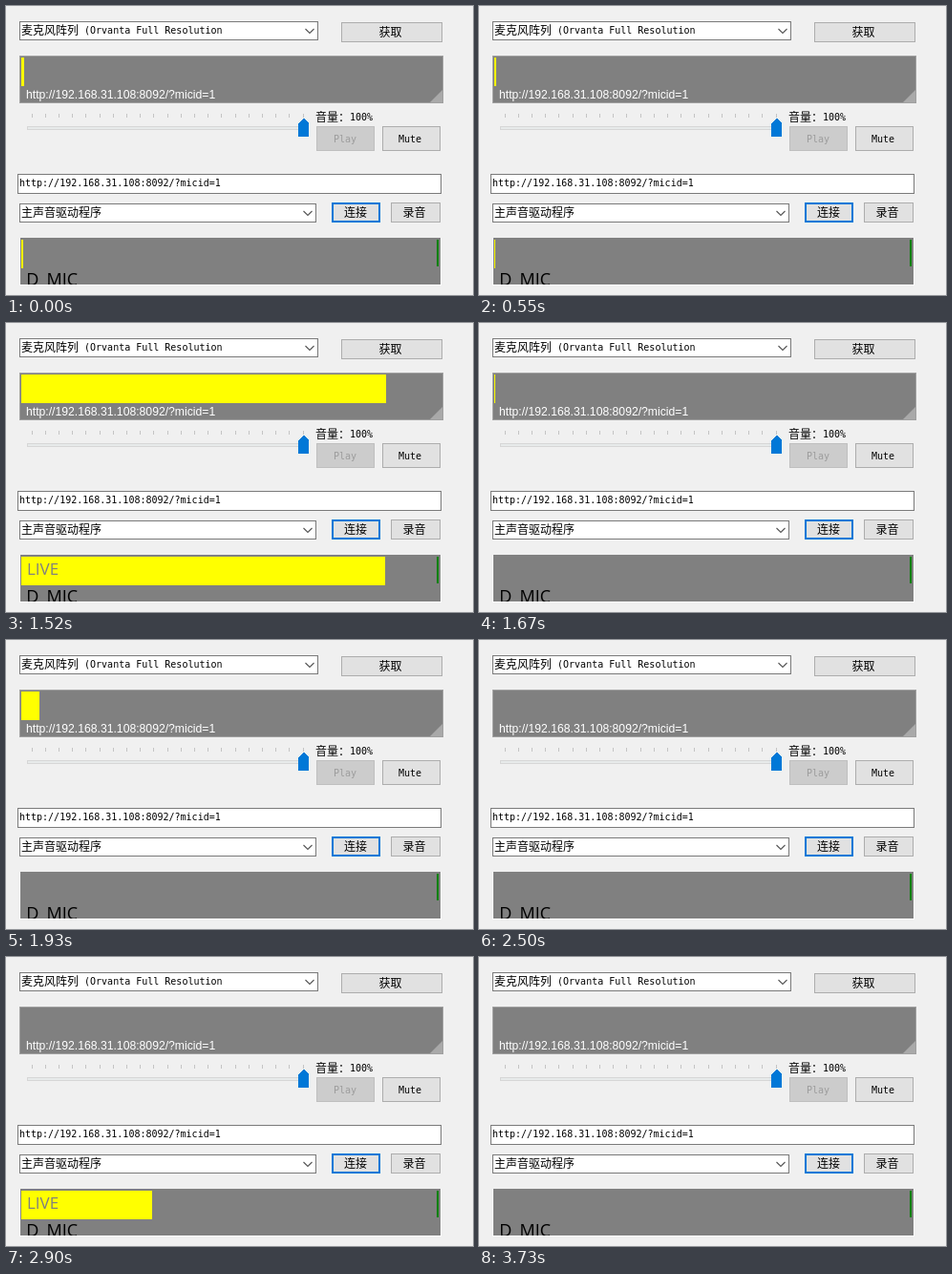
These frames come from a looping animation (489x303 px, 3.9 s). An HTML page:

```html
<!DOCTYPE html>
<html lang="zh">
<head>
<meta charset="utf-8">
<title>Audio level meters</title>
<style>
  html, body { margin: 0; width: 100%; height: 100%; overflow: hidden; background: #f0f0f0; }
  svg { display: block; }
  rect, .crisp { shape-rendering: crispEdges; }
  text { font: 10px "DejaVu Sans Mono", "Liberation Mono", monospace; white-space: pre; }
  .cjk { font: 12px "Noto Sans CJK SC", "Noto Sans CJK", sans-serif; }
  .mid { text-anchor: middle; }
  .field { fill: #fff; stroke: #7a7a7a; }
  .button { fill: #e1e1e1; stroke: #adadad; }
  .chevron { fill: none; stroke: #555; stroke-width: 1.1; }
  .panel { fill: #808080; }
  .level { fill: #ff0; }
  .url { font: 12.2px "Liberation Sans", Arial, sans-serif; fill: #fff; }
  .live { font: 17px "Open Sans", sans-serif; fill: #808080; }
  .name { font: 18px "Open Sans", sans-serif; fill: #000; }
</style>
</head>
<body>
<svg width="489" height="303" viewBox="0 0 489 303">
  <clipPath id="inside"><rect x="15" y="243" width="440" height="49"/></clipPath>

  <!-- Input device -->
  <rect class="field" x="14.5" y="16.5" width="312" height="19"/>
  <text x="16" y="29"><tspan class="cjk" dy="1">麦克风阵列</tspan><tspan dy="-1"> (Orvanta Full Resolution</tspan></text>
  <path class="chevron" d="M313.5 24l4.5 4.5 4.5-4.5"/>
  <rect class="button" x="351.5" y="17.5" width="105" height="20"/>
  <text class="cjk mid" x="402.5" y="32">获取</text>

  <!-- Upper meter -->
  <rect class="panel" x="14.5" y="52.5" width="443" height="49" stroke="#a0a0a0"/>
  <rect class="level" id="upper" x="16" y="54" height="30"/>
  <path d="M457 88v13h-13z" fill="#a9a9a9"/>
  <text class="url" x="21" y="97">http://192.168.31.108:8092/?micid=1</text>

  <!-- Volume -->
  <path class="crisp" id="ticks" stroke="#c4c4c4"/>
  <rect x="22.5" y="126.5" width="294" height="3" fill="#e7eaea" stroke="#d6d6d6"/>
  <path class="crisp" d="M311.5 117.5l5.5 5.5v14h-11v-14z" fill="#0078d7"/>
  <text x="324" y="120"><tspan class="cjk" dy="1">音量：</tspan><tspan dy="-1">100%</tspan></text>
  <rect x="325.5" y="126.5" width="60" height="25" fill="#ccc" stroke="#bfbfbf"/>
  <text class="mid" x="355" y="143" fill="#9c9c9c">Play</text>
  <rect class="button" x="394.5" y="126.5" width="60" height="25"/>
  <text class="mid" x="423" y="143">Mute</text>

  <!-- Output device -->
  <rect class="field" x="12.5" y="176.5" width="443" height="20"/>
  <text x="14" y="189">http://192.168.31.108:8092/?micid=1</text>
  <rect class="field" x="14.5" y="207.5" width="310" height="19"/>
  <text class="cjk" x="16" y="221">主声音驱动程序</text>
  <path class="chevron" d="M311.5 215l4.5 4.5 4.5-4.5"/>
  <rect x="342" y="207" width="49" height="19" fill="#e1e1e1" stroke="#0078d7" stroke-width="2"/>
  <text class="cjk mid" x="366" y="221">连接</text>
  <rect class="button" x="403.5" y="206.5" width="51" height="20"/>
  <text class="cjk mid" x="427.5" y="221">录音</text>

  <!-- Lower meter -->
  <rect x="14" y="243" width="442" height="50" fill="#fff"/>
  <rect class="panel" x="15" y="243" width="440" height="49"/>
  <rect class="level" id="lower" x="16" y="245" height="30"/>
  <rect x="451" y="245" width="2" height="28" fill="#008000"/>
  <g clip-path="url(#inside)">
    <text class="live" x="22" y="264">LIVE</text>
    <text class="name" x="21.2" y="293">D_MIC</text>
  </g>
</svg>
<script>
  const LOOP = 3900, READINGS = 28, LEAD = 45;

  // Loud readings, as reading number: bar width; the rest is hum.
  const loudUpper = { 8: 61, 11: 382, 13: 396, 14: 19, 19: 390, 20: 138 };
  const loudLower = { 8: 59, 11: 381, 13: 395, 19: 389, 20: 389, 21: 137 };
  const hum = n => Math.round(1.5 + 1.5 * Math.cos(n * 1.953));

  const byId = id => document.getElementById(id);
  const setWidth = (id, width) => byId(id).setAttribute("width", width);

  const tick = i => `M${Math.floor(27 + i * 14.2) + 0.5} 113v4`;
  byId("ticks").setAttribute("d", Array.from({ length: 21 }, (_, i) => tick(i)).join(""));

  const start = performance.now();
  function draw() {
    const t = (performance.now() - start + LEAD) % LOOP;
    const n = Math.floor(t / LOOP * READINGS);
    setWidth("upper", loudUpper[n] ?? hum(n));
    setWidth("lower", loudLower[n] ?? Math.max(0, hum(n) - 1));
    requestAnimationFrame(draw);
  }
  draw();
</script>
</body>
</html>
```
